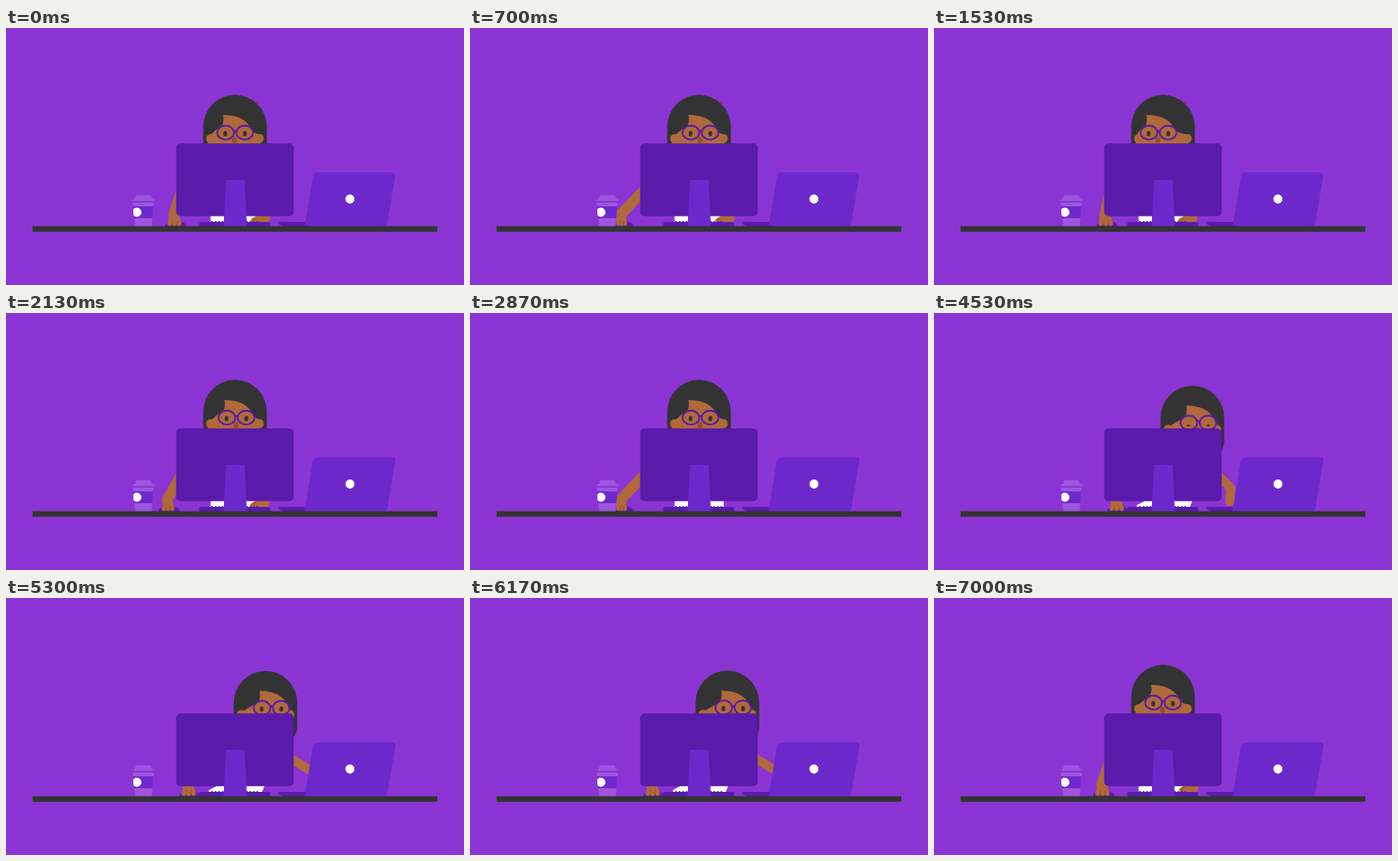
An HTML page for the animation above (7030 ms loop, 500 px wide and 281 px high).

```html
<!DOCTYPE html>
<html lang="en">
<head>
<meta charset="utf-8">
<title>At the desk</title>
<style>
html, body { margin: 0; height: 100%; overflow: hidden; background: #8b34d4; }
svg { display: block; width: 100vw; height: 100vh; }
.skin { fill: #b0693a; }
.limb { fill: none; stroke: #b0693a; stroke-linecap: round; stroke-linejoin: round; }
.crease { fill: none; stroke: #8e4f2b; stroke-width: .8; stroke-linecap: round; }
.dark { fill: #5a1aaa; }
.mid { fill: #6d28cc; }
.light { fill: #9d55e0; }
.hair { fill: #333; }
</style>
</head>
<body>
<svg viewBox="0 0 500 281">
  <clipPath id="sleeve"><path d="M138.6 195H160.8L159.8 208H139.6Z"/></clipPath>

  <g id="head">
    <path class="hair" d="M215.3 143V107.8a34.7 34.7 0 0 1 69.4 0V134Q285 140 281 145Z"/>
    <circle class="skin" cx="223.5" cy="121" r="5"/>
    <circle class="skin" cx="276.5" cy="121" r="5"/>
    <path class="skin" id="face"/>
    <g id="features">
      <ellipse cx="249.5" cy="122.5" rx="2.8" ry="3.6" fill="#93502b"/>
      <g class="hair">
        <ellipse class="eye" cx="239.3" cy="115.5" rx="2.1"/>
        <ellipse class="eye" cx="260.8" cy="115.5" rx="2.1"/>
      </g>
      <g fill="none" stroke="#5a1aaa" stroke-width="1.9">
        <ellipse cx="239.7" cy="114.4" rx="9.2" ry="7.7"/>
        <ellipse cx="260.6" cy="114.4" rx="9.2" ry="7.7"/>
        <path d="M248.5 113.5Q250.2 112 251.8 113.5"/>
      </g>
    </g>
  </g>

  <path id="shirt" fill="#fff"/>
  <g id="typing">
    <path class="skin" d="M273 198H288V210Q288 213 284 213H271Q267 213 267 210.5Q268 207.5 273 206Z"/>
    <path class="crease" d="M269 211L273.5 207.5"/>
  </g>
  <path id="reach" class="limb" stroke-width="10"/>

  <rect class="dark" x="211" y="212" width="77.5" height="6" rx="2"/>
  <path d="M225 212.2H278" stroke="#5a1aaa" stroke-width="2.2" stroke-linecap="round" stroke-dasharray="0 3.8"/>
  <path class="dark" d="M297 212H332V217H302Q298 216 297 212Z"/>

  <path id="mouse" class="dark" d="M-11.5 217Q-11 211.5-3 211.5H4Q11.5 212 12 217Z"/>
  <path id="arm" class="limb" stroke-width="11.5"/>
  <path id="fingers" class="limb" stroke-width="5.2"/>
  <path id="gaps" class="crease"/>

  <rect class="dark" x="185.7" y="126.2" width="128.5" height="79.6" rx="5"/>
  <path class="mid" d="M240 166H260.5L263 217H237.5Z"/>

  <path class="mid" d="M341 157.8H421.5Q425.6 157.8 425 162L416.5 212.5Q415.8 216.8 411.5 216.8H326L335 162.5Q336 157.8 341 157.8Z"/>
  <circle cx="375.5" cy="187" r="4.9" fill="#fff"/>

  <path class="light" d="M142 183H158L160.5 188.6H139.5Z"/>
  <rect class="light" x="138" y="187.4" width="24" height="1.6" rx=".8"/>
  <path class="light" d="M138.4 191H161.1L159 217H141Z"/>
  <path class="mid" d="M138.6 195H160.8L159.8 208H139.6Z"/>
  <circle cx="142.8" cy="201.5" r="5.1" fill="#fff" clip-path="url(#sleeve)"/>

  <rect class="hair" x="29" y="216.7" width="442" height="6.1"/>
</svg>
<script>
const LOOP = 7030;
const $ = id => document.getElementById(id);
const eyes = document.querySelectorAll('.eye');
const draw = (id, d) => $(id).setAttribute('d', d);
const move = (id, x, y) => $(id).setAttribute('transform', `translate(${x} ${y})`);

function frame(now) {
  const t = now % LOOP;
  // Eased rise from 0 to 1, and a rise that later falls back
  const ramp = (from, to) => {
    const p = Math.min(1, Math.max(0, (t - from) / (to - from)));
    return p * p * (3 - 2 * p);
  };
  const pulse = (a, b, c, d) => ramp(a, b) - ramp(c, d);

  // Head: glance left, then lean over to the laptop and back
  const lean = pulse(4000, 4600, 6030, 6900);
  const look = 1.5 * pulse(0, 250, 6100, 6900) - 6.5 * pulse(1050, 1420, 1680, 2050)
    + 5 * pulse(4000, 4500, 6100, 6900);
  const open = 1 - .9 * pulse(2350, 2430, 2430, 2550) - .7 * pulse(4380, 4500, 4560, 4700);
  const fx = x => x + look;
  move('head', 33.3 * lean, 6.6 * lean);
  move('features', look, -.8 * lean);
  draw('face', `M220 130V121Q${fx(228)} 111 ${fx(233)} 109.5Q${fx(239)} 106 ${fx(237)} 95
    Q${fx(259)} 95 ${fx(267)} 109Q${fx(269)} 115 277 116.5V130Z`);
  for (const eye of eyes) {
    eye.setAttribute('ry', 2.9 * open);
    eye.setAttribute('cy', 118.1 - 2.6 * open);
  }
  draw('shirt', `M${223.5 + 6 * lean} 204H${277 + 5 * lean}V206L${277 + 2 * lean} 213H${223.5 - 2 * lean}
    V210L${223.5 + 6 * lean} 206Z`);

  // Keyboard hand taps and lifts out of sight
  const lift = pulse(2300, 2550, 3680, 3950) + pulse(4150, 4350, 6400, 6700);
  move('typing', .7 * Math.sin(t / 90), .7 * Math.sin(t / 45) - 14 * lift);

  // Other arm swings out, then settles on the laptop and types
  const out = pulse(4200, 4530, 6200, 6500);
  const settle = out * ramp(4530, 4850);
  const tap = 1.5 * Math.sin(t / 40) * pulse(5150, 5200, 5800, 5850);
  draw('reach', `M304 ${171 + tap / 3}
    L${296 + 28 * out - 3 * settle} ${180 + 11.5 * out - 10.5 * settle + tap}
    L${296 + 27 * out + 15 * settle} ${192 + 14 * out - 15 * settle + tap}`);

  // Mouse hand slides along the desk; its fingers spread near the body
  const m = 184 - 18.5 * ramp(0, 550) + 22 * ramp(900, 1480) - 10.5 * ramp(1620, 2050)
    - 11.5 * ramp(2250, 2650) + 34 * ramp(3000, 4020) - 15.5 * ramp(6450, 7000);
  const gap = Math.min(5.4, 3.4 + (m - 165.5) * .1);
  move('mouse', m + 1, 0);
  draw('arm', `M193 174L${m - 1} 204L${m - .5} 208`);
  draw('fingers', [-1, 0, 1].map(i => `M${m + i * gap * .5} 206L${m + i * gap} 213.8`).join(''));
  draw('gaps', [-.5, .5].map(i => `M${m + i * gap} 211V215.5`).join(''));

  requestAnimationFrame(frame);
}
requestAnimationFrame(frame);
</script>
</body>
</html>
```
